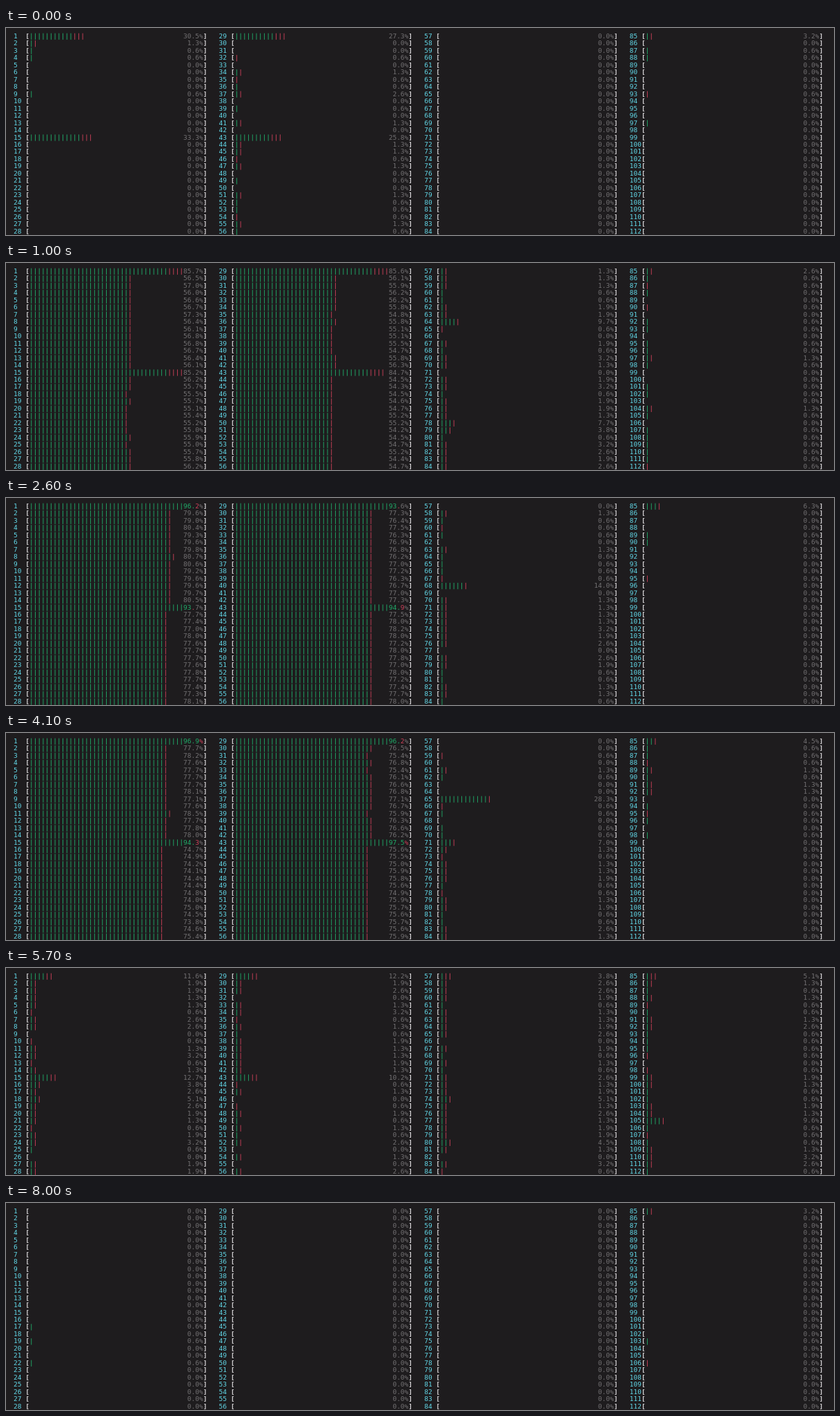
Write an HTML page with a canvas that moves like this. It is 1200 by 300 pixels and loops after 8100 ms.

```html
<!DOCTYPE html>
<html lang="en">
<head>
<meta charset="utf-8">
<title>CPU meters</title>
<style>
  html, body { margin: 0; width: 100%; height: 100%; overflow: hidden; background: #1e1c1e; }
  canvas { display: block; }
</style>
</head>
<body>
<canvas id="stage" width="1200" height="300"></canvas>
<script>
const LOOP = 8100;
const CELL = 5.723, ROW = 10.48, LEFT = 11, BASELINE = 14.8;
const ROWS = 28, CORES = 112, BLOCK = 14, COLUMN_CELLS = 52, BAR_CELLS = 44;
const TICK = .64; // smallest step of a light load, in percent
const FONT = '9.506px "DejaVu Sans Mono", monospace';
const COLOR = {
  back: '#1e1c1e', label: '#62d8e8', bracket: '#d8d6d8',
  user: '#20ac69', system: '#cc4059', idle: '#737173'
};
const ctx = document.getElementById('stage').getContext('2d');

// Per block of 14 cores: load of the first core and mean load of the others.
// system: red bars of the first cores; task: one busy core and its load.
const phases = [
  { at: 0, system: 3,
    leads: [30.5, 33.3, 27.3, 25.8, 0, 0, 3.2, 0],
    levels: [.3, 0, .9, 1, .1, .1, .2, 0] },
  { at: 1000, system: 4, task: [64, 9.7],
    leads: [85.7, 85.2, 85.6, 84.7, 1.3, 0, 2.6, 0],
    levels: [56.5, 55.6, 55.6, 54.8, 1.4, 1.8, .5, .4] },
  { at: 2500, system: 1, task: [68, 14],
    leads: [96.2, 93.7, 93.6, 94.9, 0, 1.3, 6.3, 0],
    levels: [79.8, 77.4, 76.7, 77.6, 1, 1.8, .2, 0] },
  { at: 4100, system: 1, task: [65, 28.3],
    leads: [96.9, 94.3, 96.2, 97.5, 0, 7, 4.5, 0],
    levels: [77.8, 74.6, 76.3, 75.4, .5, 1.2, .6, .1] },
  { at: 5700, system: 2, task: [105, 9.6],
    leads: [11.6, 12.7, 12.2, 10.2, 3.8, 2.6, 5.1, 1.9],
    levels: [1.8, 1.8, 1.3, 1, 2.1, 2.4, 1.4, 1.5] },
  { at: 7200, system: 2,
    leads: [0, 0, 0, 0, 0, 0, 3.2, 0],
    levels: [.1, .15, 0, .1, 0, 0, 0, .2] }
];

function seededRandom(seed) {
  return () => {
    seed = (seed + 0x6D2B79F5) | 0;
    let t = Math.imul(seed ^ (seed >>> 15), seed | 1);
    t ^= t + Math.imul(t ^ (t >>> 7), t | 61);
    return ((t ^ (t >>> 14)) >>> 0) / 4294967296;
  };
}

// Heavy loads scatter around their level; light ones come in whole ticks.
function scatter(level, random) {
  const a = random(), b = random();
  if (level > 5) return level + a + b - 1;
  const light = -Math.log((1 - a) * (1 - b)) / 2 * level;
  return Math.round(light / TICK) * TICK;
}

function makeMeter(phase, core, random) {
  const block = Math.floor((core - 1) / BLOCK);
  const leads = (core - 1) % BLOCK === 0;
  const scattered = scatter(phase.levels[block], random);
  const chance = random();

  let load = leads ? phase.leads[block] : scattered;
  if (phase.task && phase.task[0] === core) load = phase.task[1];

  const total = load ? Math.ceil((load + 1.2) * BAR_CELLS / 100) : 0;
  let system = total > 1 ? 1 : 0;
  if (leads) system = Math.min(phase.system, Math.max(0, total - 1));
  else if (total === 1) system = chance < .25 ? 1 : 0;
  return { core, load, user: total - system, system };
}

function makeMeters(phase) {
  const random = seededRandom(phase.at + 1);
  return Array.from({ length: CORES }, (_, i) => makeMeter(phase, i + 1, random));
}

function drawMeter({ core, load, user, system }) {
  const column = Math.floor((core - 1) / ROWS);
  const y = BASELINE + (core - 1) % ROWS * ROW;
  const cellX = cell => LEFT + (column * COLUMN_CELLS + cell) * CELL;
  const write = (text, cell, color, weight = '') => {
    ctx.font = weight + ' ' + FONT;
    ctx.fillStyle = color;
    [...text].forEach((char, i) => ctx.fillText(char, cellX(cell + i), y));
  };
  const barColor = i => i < user ? COLOR.user : i < user + system ? COLOR.system : COLOR.idle;

  write(String(core), 0, COLOR.label);
  write('[', 3, COLOR.bracket, 'bold');
  write(']', 4 + BAR_CELLS, COLOR.bracket, 'bold');

  const text = load.toFixed(1) + '%';
  const textStart = BAR_CELLS - text.length;
  for (let i = 0; i < Math.min(user + system, textStart); i++) {
    ctx.fillStyle = barColor(i);
    ctx.fillRect(cellX(4.5 + i) - .45, y - 7.2, .9, 9.3);
  }
  [...text].forEach((char, i) => write(char, 4 + textStart + i, barColor(textStart + i)));
}

function drawPhase(phase) {
  ctx.fillStyle = COLOR.back;
  ctx.fillRect(0, 0, 1200, 300);
  makeMeters(phase).forEach(drawMeter);
}

let shown = null;
const start = performance.now();
function tick() {
  const time = Math.max(0, performance.now() - start) % LOOP;
  const current = phases.filter(phase => phase.at <= time).pop();
  if (current !== shown) drawPhase(shown = current);
  requestAnimationFrame(tick);
}
tick();
</script>
</body>
</html>
```
